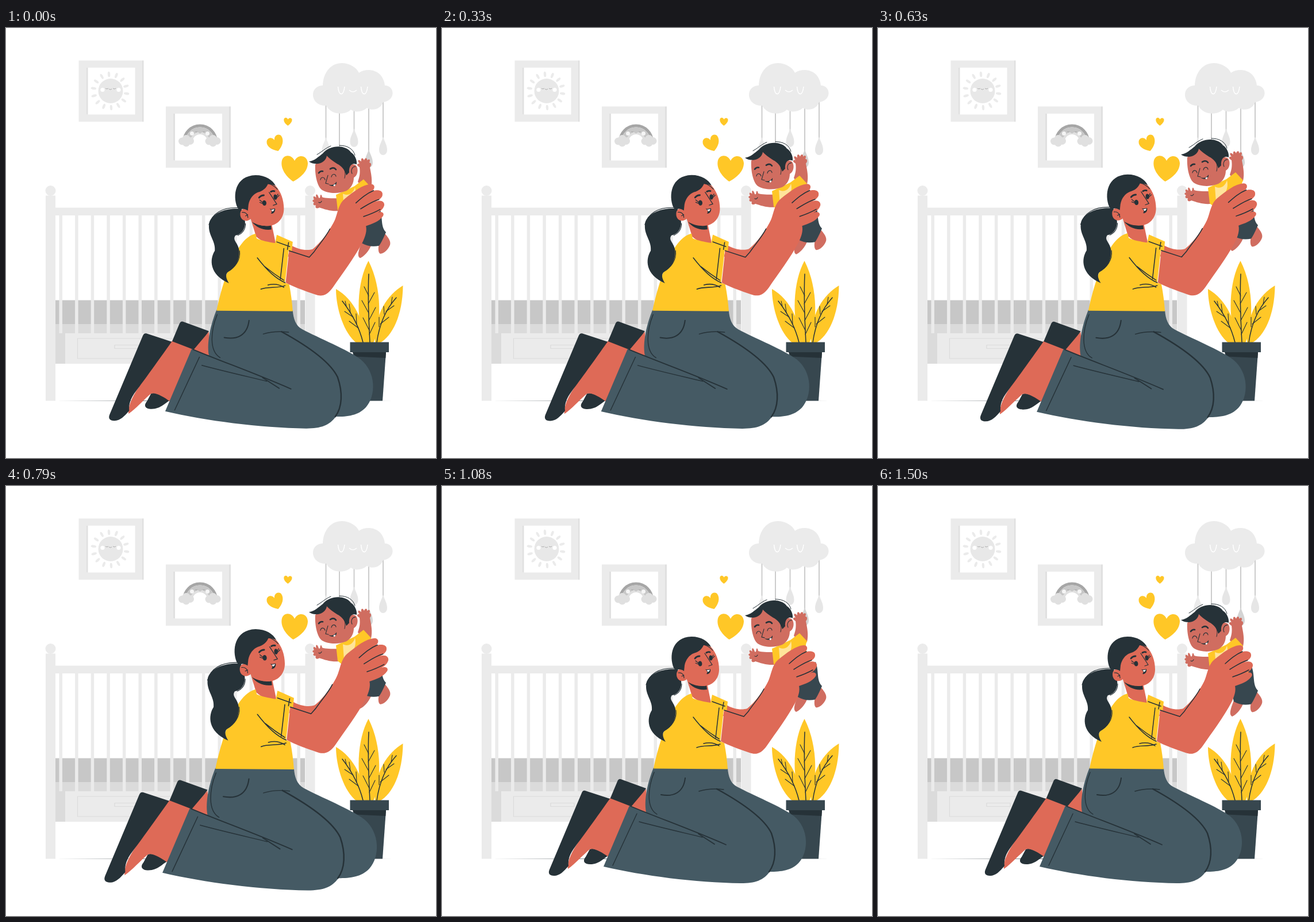
Animation, 748 px wide and 748 px high, one loop 1.54 s. Source, as an HTML page with a canvas:

```html
<!DOCTYPE html>
<html lang="en">
<head>
<meta charset="utf-8">
<title>Mother and baby</title>
<style>
html, body { margin: 0; width: 100%; height: 100%; overflow: hidden; background: #fff; }
canvas { display: block; width: 748px; height: 748px; }
</style>
</head>
<body>
<canvas id="stage"></canvas>
<script>
const SIZE = 748, LOOP = 1540, FPS = 24, FRAMES = 37;
const PALE = '#ebebeb', LIGHT = '#e0e0e0', SOFT = '#dbdbdb', GREY = '#c7c7c7', WHITE = '#fff';
const YELLOW = '#ffc727', CREAM = '#ffe49a', DARK = '#263238', SLATE = '#455a64', POT = '#37474f';
const SKIN = '#de6a57', BABY_SKIN = '#d06d60';

const canvas = document.getElementById('stage');
const ctx = canvas.getContext('2d');
const dpr = window.devicePixelRatio || 1;
canvas.width = canvas.height = SIZE * dpr;

// A shape is filled, or stroked when it has a line width.
const shape = (color, d, width) => ({ color, width, path: new Path2D(d) });
const lines = (width, ...ds) => ds.map(d => shape(DARK, d, width));

function draw(shapes) {
  for (const { color, path, width } of shapes) {
    if (width) {
      ctx.strokeStyle = color;
      ctx.lineWidth = width;
      ctx.stroke(path);
    } else {
      ctx.fillStyle = color;
      ctx.fill(path);
    }
  }
}

function rect(color, x, y, x2, y2) {
  ctx.fillStyle = color;
  ctx.fillRect(x, y, x2 - x, y2 - y);
}

function disc(color, x, y, rx, ry = rx, angle = 0) {
  ctx.fillStyle = color;
  ctx.beginPath();
  ctx.ellipse(x, y, rx, ry, angle, 0, 7);
  ctx.fill();
}

function pictureFrame(x, y) {
  rect(PALE, x, y, x + 110, y + 106.5);
  rect(LIGHT, x + 110, y, x + 113, y + 106.5);
  rect(WHITE, x + 13, y + 12.5, x + 98, y + 94);
  rect(LIGHT, x + 13, y + 12.5, x + 16, y + 94);
}

const sunFace = [
  shape('#a6a6a6', 'M173 105q2.5 2 5 0M186 105q2.5 2 5 0M179 106q2.5 2.5 5 0', 0.9)
];

function sunPicture() {
  pictureFrame(126.5, 56.5);
  for (let i = 0; i < 14; i++) {
    const a = (i + 0.35) * Math.PI / 7;
    disc(PALE, 181 + 29 * Math.cos(a), 109.5 + 29 * Math.sin(a), 4.8, 2.2, a);
  }
  disc('#e8e8e8', 182, 109.5, 21.5);
  disc(WHITE, 168, 107.5, 3.6);
  disc(WHITE, 196, 107.5, 3.6);
  draw(sunFace);
}

const rainbowFace = [
  shape('#a6a6a6', 'M329 180q2 2 4 0M342 180q2 2 4 0M335 181q2.5 3 5 0', 0.9)
];

function rainbowPicture() {
  pictureFrame(278, 136.5);
  for (const [color, radius, width] of [['#a6a6a6', 28, 5], [GREY, 21, 9], [LIGHT, 15, 4]]) {
    ctx.strokeStyle = color;
    ctx.lineWidth = width;
    ctx.beginPath();
    ctx.arc(337.5, 198, radius, Math.PI, 0);
    ctx.stroke();
  }
  disc('#f5f5f5', 323.5, 183.5, 3.5);
  disc('#f5f5f5', 350.5, 183.5, 3.5);
  draw(rainbowFace);
  for (const x of [313.5, 360]) {
    disc(LIGHT, x - 7, 197, 6.5);
    disc(LIGHT, x + 7, 196.5, 6.5);
    disc(LIGHT, x, 193, 7);
    disc(LIGHT, x, 200, 6.5);
  }
}

const drawer = [shape(SOFT, 'M124.5 540H330V575H124.5ZM189 551.5H230V557.5H189Z', 1.2)];

function crib() {
  rect(GREY, 86, 473.5, 520, 515);
  rect(SOFT, 86, 515, 520, 531);
  rect(PALE, 86, 531, 520, 584);
  rect(SOFT, 86, 531, 103, 584);
  draw(drawer);
  for (let i = 0; i < 16; i++) {
    const x = 92.5 + i * 27.6;
    rect(PALE, x, 326, x + 5.5, 531);
  }
  rect(PALE, 86, 312.5, 521, 326);
  for (const x of [69, 520.5]) {
    rect(PALE, x, 291.5, x + 17, 648.5);
    disc(PALE, x + 8.5, 283, 9);
  }
}

const ground = [shape(DARK, 'M86 648.5L381 647.9L676 648.5L381 649.1Z')];

const cloud = [
  shape(PALE, `M551 100C552 75 567 61 584 61C598 61 610 69 614 78C628 68 656 72 659 100
    C668 100 673 107 672.5 114C672 123 664 128 656 129C653 139 640 146 628 139C618 147 606 147 600 142
    C590 152 566 152 557 135C545 136 534 128 534 116C534 106 542 100 551 100Z`),
  shape(WHITE, 'M577.5 102C579 119 587 119 589 102M617.5 102C619 119 627 119 629 102M597 108Q603.5 114 610 108', 1.5)
];

function drop(color, x, top) {
  ctx.fillStyle = color;
  ctx.beginPath();
  ctx.moveTo(x, top);
  ctx.bezierCurveTo(x + 3, top + 10, x + 7, top + 15, x + 7, top + 23);
  ctx.bezierCurveTo(x + 7, top + 35, x - 7, top + 35, x - 7, top + 23);
  ctx.bezierCurveTo(x - 7, top + 15, x - 3, top + 10, x, top);
  ctx.fill();
}

function mobile() {
  const strings = [[556.5, 132, 190, PALE], [580, 148, 212, PALE], [605.5, 142, 175, '#e6e6e6'],
    [631, 140, 211, '#d4d4d4'], [656, 128, 189, '#e6e6e6']];
  for (const [x, top, end, color] of strings) {
    rect(GREY, x - 0.9, top, x + 0.9, end + 4);
    drop(color, x, end);
  }
  draw(cloud);
}

const hearts = [
  shape(YELLOW, 'M499.5 267C488 259 478 246 479.5 233C481 219 497 219 502 231C508 219 524 221 525 235C525 249 513 260 499.5 267Z'),
  shape(YELLOW, 'M473.5 214C462 212 453 206 453.5 198C454 190 463 189 467 195C466 186 475 183 479 188C484 195 481 206 473.5 214Z'),
  shape(YELLOW, 'M490.5 170C486 167 482.5 163 483.5 158.5C485 155 489 155.5 490.5 159C492 155.5 496.5 155.5 497.5 159C498 163.5 494 167 490.5 170Z')
];

const plant = [
  shape(YELLOW, 'M574 454C574 488 588 532 610 548H624C624 512 606 472 574 454Z'),
  shape(YELLOW, 'M690.5 448C664 464 640 497 642 548H650C672 536 690 500 690.5 448Z'),
  shape(YELLOW, 'M630.5 405C611 440 607 505 625 548H639C652 520 656 455 630.5 405Z'),
  ...lines(1.5, 'M585 475C602 497 615 522 621 547', 'M679 469C660 490 649 518 645 547', 'M631 428C629 470 631 510 633 547'),
  ...lines(1.1, 'M592 484L590 475M599 495L597 480M604 503L589 493M610 515L609 497M613 522L597 510',
    'M670 480L672 468M661 493L675 483M658 498L657 484M651 515L666 503M649 520L649 503',
    'M631 466L623 450M630 480L641 460M631 496L619 474M631 509L643 486M632 526L621 504M632 533L642 512'),
  shape(POT, 'M603.5 564H661L655 648.5H609Z'),
  shape(DARK, 'M603 564H661L660.3 574L607 571.5Z'),
  shape(POT, 'M598.5 546.5H666V564H598.5Z')
];

const baby = [
  // feet and trousers
  shape(BABY_SKIN, 'M619 373L635 379C632 388 622 399 616 401C610 398 613 388 619 373Z'),
  shape(BABY_SKIN, 'M658 357C664 364 670 371 668 378C665 386 658 393 651 393.5C646 391 648 380 649 375Z'),
  shape(POT, 'M620 335L650 314C656 330 651 346 661 356C657 365 653 374 649 379.5C638 382 627 380 619 375C615 360 616 345 620 335Z'),
  // arms
  shape(BABY_SKIN, `M577 297C566 297 556 297 550 295C549 290 547 289 546.5 294C546 297 545 297 544 296
    C542 289 538 288 539.5 296C536 292 533 294 536 299C532 300 533 303 536 304C533 307 535 310 539 309
    C537 314 541 316 545 313C554 316 566 320 578 319Z`),
  shape(BABY_SKIN, `M612 268C616 258 616 250 615 243C609 240 610 236 615 237C610 231 613 228 618 233
    C617 227 620 225 623 231C624 226 629 226 628 231C633 227 634 231 632 235C636 235 636 240 633 243
    C635 254 638 266 635 279L622 284Z`),
  // shirt
  shape(YELLOW, 'M574 291L606 276L622 264L635 278C628 290 640 315 645 325L610 345L577 318Z'),
  shape(CREAM, 'M586 289C596 294 604 288 607 278C611 292 602 310 588 316Z'),
  // head
  shape(BABY_SKIN, `M538 238C537 252 540 274 549 282C562 290 580 289 592 284C601 279 605 270 605 261
    C614 257 614 238 604 238L570 214Z`),
  shape(DARK, `M527 233C537 232 544 224 551 219C563 204 590 203 600 217C607 221 611 231 610 238
    C601 234 596 242 597 252L592 257C589 247 584 241 576 237C568 232 562 227 558 223
    C557 230 551 236 541 237C536 237 531 236 527 233Z`),
  ...lines(1, 'M541 221C550 216 555 210 565 206M580 205C594 205 604 211 607 222M574 232C588 239 592 250 589 262'),
  ...lines(2.6, 'M544 253Q547 249 551 250', 'M564 246Q570 242 574 247'),
  ...lines(1.1, 'M547 265C548 259 554 260 555 265M566 260C567 254 573 254 574 259',
    'M560 257L556 271L561 272', 'M602 254C599 248 603 241 608 242M549 302Q547 306 544 304'),
  shape(DARK, 'M561 273C567 275 572 273 575 268C576 276 567 278 561 273Z'),
  shape(WHITE, 'M569 274L573 272Q573 276 571 276Z')
];

const legs = [
  shape(DARK, 'M311 510L355 526L332 562L292 545L305 514Q307 509 311 510Z'),
  shape(SKIN, 'M355 527L358 570L328 559Z'),
  shape(DARK, 'M257 632C265 628 278 638 290 643C281 647 274 658 258 658C247 658 244 652 250 645Z'),
  shape(SKIN, 'M292 543L328 557L289 645C278 637 264 629 257 632C246 641 230 659 219 666C218 640 240 615 292 543Z'),
  shape(DARK, `M249 530L292 544C270 575 245 610 232 627C222 640 219 650 220 661C212 670 205 678 195 678
    C187 678 184 674 187 667L243 534Q245 529 249 530Z`)
];

const trousers = [
  shape(SLATE, `M368 490L497 491C498 505 502 517 513 523C541 538 591 558 612 574C639 596 638 636 621 655
    C608 669 590 671 570 671C559 686 545 691 520 691C440 690 350 678 281 662L326 556C338 562 348 566 355 567
    C351 545 358 515 368 490Z`),
  ...lines(2.4, 'M478 527C520 550 560 577 573 604C582 630 581 655 569 671'),
  ...lines(2, 'M381 537C402 541 420 534 423 508'),
  ...lines(1.4, 'M369 498C358 525 355 560 374 571', 'M447 531C460 527 475 526 490 528', 'M339 570L297 660',
    'M343 584C380 594 420 603 453 611'),
  ...lines(1.8, 'M328 557C380 579 425 594 494 624', 'M446 605L474 623')
];

const torso = [
  shape(SKIN, 'M424 330L435 366C446 376 457 378 468 377L461 343Z'),
  shape(DARK, 'M428 341C440 348 450 349 460 346L461 354C447 356 435 350 428 341Z'),
  shape(SKIN, 'M493 380C508 389 522 390 531 387C550 372 566 345 575 325L585 345L524 410L489 400Z'),
  shape(YELLOW, `M434 361C414 366 401 390 392 412C384 430 374 462 368 491.5L497 492.5
    C496 478 494 462 491 447L484 444L490 390L495 394L497 375L470 363L467 377C456 375 444 373 436 369Z`)
];

const nearArm = [
  shape(SKIN, `M491 389L525 401C540 386 557 362 566 343C573 330 573 312 585 302C600 290 615 278 629 277
    C637 277 637 285 631 289C640 286 650 287 649 295C649 300 643 304 637 307C645 303 653 306 652 313
    C650 320 645 323 640 326C647 322 653 326 650 331C643 341 632 344 621 348C623 356 620 366 615 376
    C602 401 580 430 565 452C555 466 546 468 535 464C518 458 500 452 485 444Z`),
  ...lines(1.5, 'M604 309C613 301 622 293 634 288', 'M612 319C622 313 632 306 643 303', 'M617 332C626 329 636 325 645 320'),
  ...lines(1.5, 'M491 390L525 401L533 392C541 380 553 367 560 353'),
  ...lines(1.5, 'M482 386L476 438', 'M470 375L492 383M490 376L488 388',
    'M437 402C450 419 467 437 484 444M450 417Q466 430 482 440', 'M443 455C455 450 470 454 484 449', 'M455 448C466 445 476 448 482 452')
];

const head = [
  shape(DARK, `M410 319C392 317 364 322 356 341C351 362 367 372 365 390C356 404 355 430 389 445
    C384 437 382 430 388 425C402 418 408 402 406 388C404 376 394 372 400 364C414 362 419 346 415 335Z`),
  ...lines(1.1, 'M404 317C378 316 360 327 355 346',
    'M407 390C409 406 399 419 386 426M417 344Q417 358 404 364'),
  shape(SKIN, `M415 305C420 280 445 266 468 280C477 290 482 304 482 319C482 337 469 349 452 348
    C439 347 429 341 426 336C418 343 408 338 408 328C408 320 414 317 420 320Z`),
  shape(DARK, `M403 316C395 297 399 263 434 262C451 262 463 270 468 280C464 278 459 277 455 277
    C452 284 446 289 438 291C430 294 424 302 422 312L421 322C414 317 407 319 408 324Z`),
  ...lines(1.1, 'M455 276C460 277 467 281 471 286', 'M411 325C417 324 421 328 421 334M417 331L421 329'),
  ...lines(2.8, 'M440 300Q443 296 448 296', 'M460 290Q463 288 466 289'),
  ...lines(1.2, 'M457 291L470 311L464 313', 'M446 308L441 304M446 310L441 308M469 299L472 294M470 300L474 296'),
  shape(DARK, 'M448.5 304.5C453 304 454 313 449.5 313.5C445 314 444 305 448.5 304.5Z'),
  shape(DARK, 'M467 294.5C471 294 472 303 468 303.5C464 304 463 295 467 294.5Z'),
  shape(DARK, 'M457 318C461 321 464 318 467 318.5C468 324 464 328 460 327C463 324 461 321 457 318Z'),
  shape(WHITE, 'M460.5 320.5L466 319.5Q465 323 462.5 323.5Z')
];

const woman = [...legs, ...trousers, ...torso, ...nearArm, ...head];

// Two beats, then rest: piecewise linear over the loop.
function heartbeat(u) {
  const keys = [[0, 1], [0.1, 1.1], [0.3, 1], [0.4, 1], [0.5, 1.1], [0.6, 1], [1, 1]];
  const i = Math.max(1, keys.findIndex(([at]) => at >= u));
  const [u0, s0] = keys[i - 1], [u1, s1] = keys[i];
  return s0 + (s1 - s0) * (u - u0) / (u1 - u0);
}

const floatUp = u => -15 * (1 - Math.abs(2 * u - 1));

function render(now) {
  const ms = Math.floor((now % LOOP) / 10) * 10;
  const step = Math.min(FRAMES - 1, Math.floor((ms + 4.9) * FPS / 1000));
  const u = (step + 1) / FRAMES;

  ctx.setTransform(dpr, 0, 0, dpr, 0, 0);
  rect(WHITE, 0, 0, SIZE, SIZE);
  ctx.lineCap = 'butt';
  sunPicture();
  rainbowPicture();
  crib();
  draw(ground);
  mobile();
  ctx.lineCap = ctx.lineJoin = 'round';
  draw(hearts);
  draw(plant);

  ctx.save();
  ctx.translate(0, floatUp(u));
  draw(baby);
  ctx.restore();

  ctx.save();
  const scale = heartbeat(u);
  ctx.translate(431, 482);
  ctx.scale(scale, scale);
  ctx.translate(-431, -482);
  draw(woman);
  ctx.restore();
}

const start = performance.now();
function tick() {
  render(performance.now() - start);
  requestAnimationFrame(tick);
}
tick();
</script>
</body>
</html>
```
